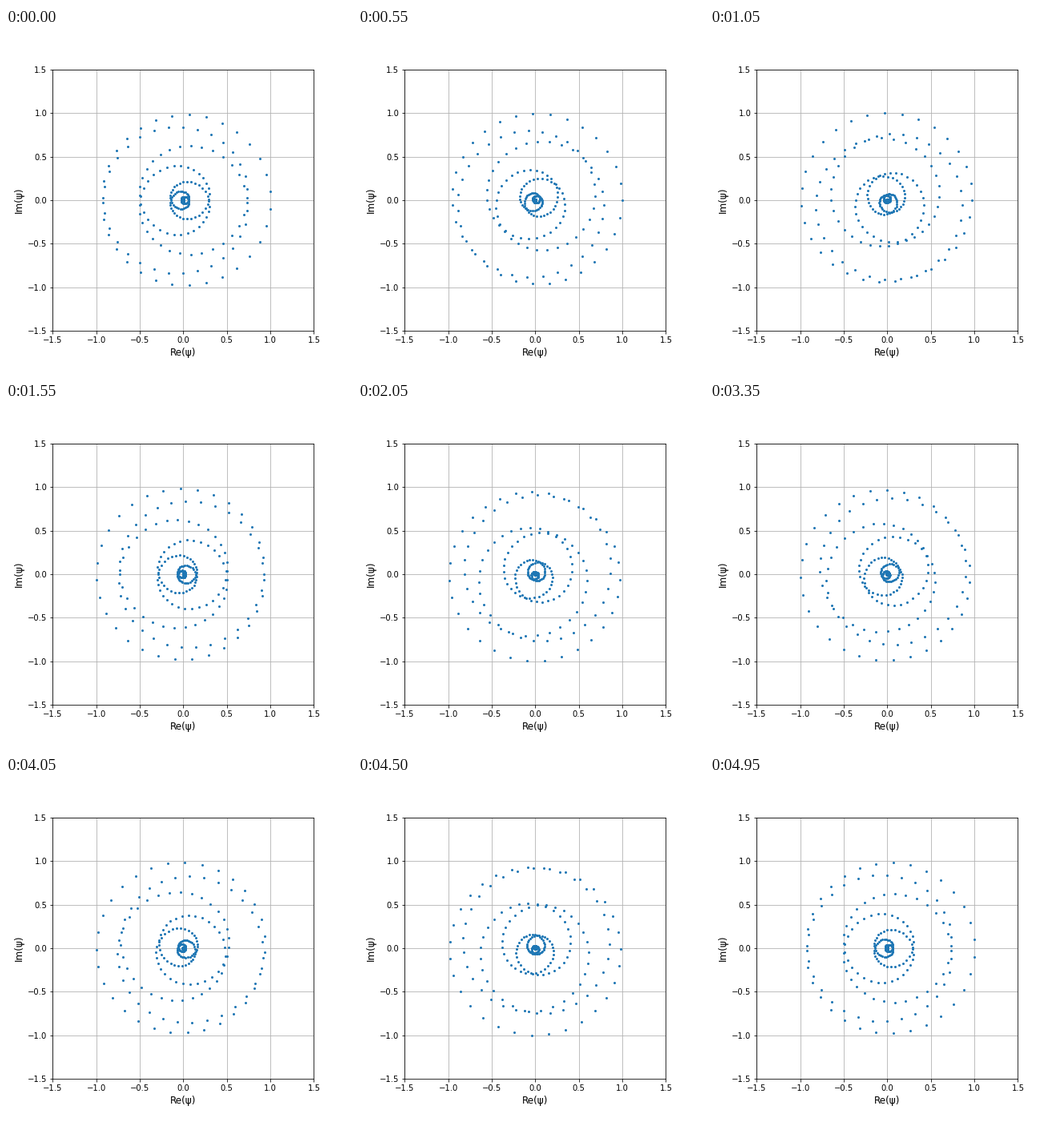
A matplotlib script for the animation above (5 s loop, 432 by 432 pixels).

```python
import numpy as np
import matplotlib.pyplot as plt
from matplotlib.animation import FuncAnimation

FRAMES = 100
INTERVAL = 50  # ms
K = 8          # wave number, equal to the angular frequency
LIMIT = 1.5

plt.rcParams["font.family"] = "DejaVu Sans"

x = np.linspace(-5, 5, 400)
times = np.linspace(0, 2 * np.pi, FRAMES)
envelope = np.exp(-x**2 / 2)


def packet(t):
    """Plane wave under a fixed Gaussian envelope."""
    return envelope * np.exp(1j * K * (x - t))


fig, ax = plt.subplots(figsize=(6, 6), dpi=72)
fig.subplots_adjust(left=0.125, right=0.9, bottom=0.125, top=0.88)
ax.set_aspect("equal")
ax.set_xlim(-LIMIT, LIMIT)
ax.set_ylim(-LIMIT, LIMIT)
ticks = np.arange(-3, 4) / 2
ax.set_xticks(ticks)
ax.set_yticks(ticks)
ax.set_xlabel("Re(ψ)", fontsize=12)
ax.set_ylabel("Im(ψ)", fontsize=12)
ax.grid(True)

dots, = ax.plot([], [], "o", markersize=2, color="#1f77b4")


def update(i):
    psi = packet(times[i])
    dots.set_data(psi.real, psi.imag)
    return dots,


anim = FuncAnimation(fig, update, frames=FRAMES, interval=INTERVAL,
                     repeat=True, repeat_delay=0)
plt.show()
```
